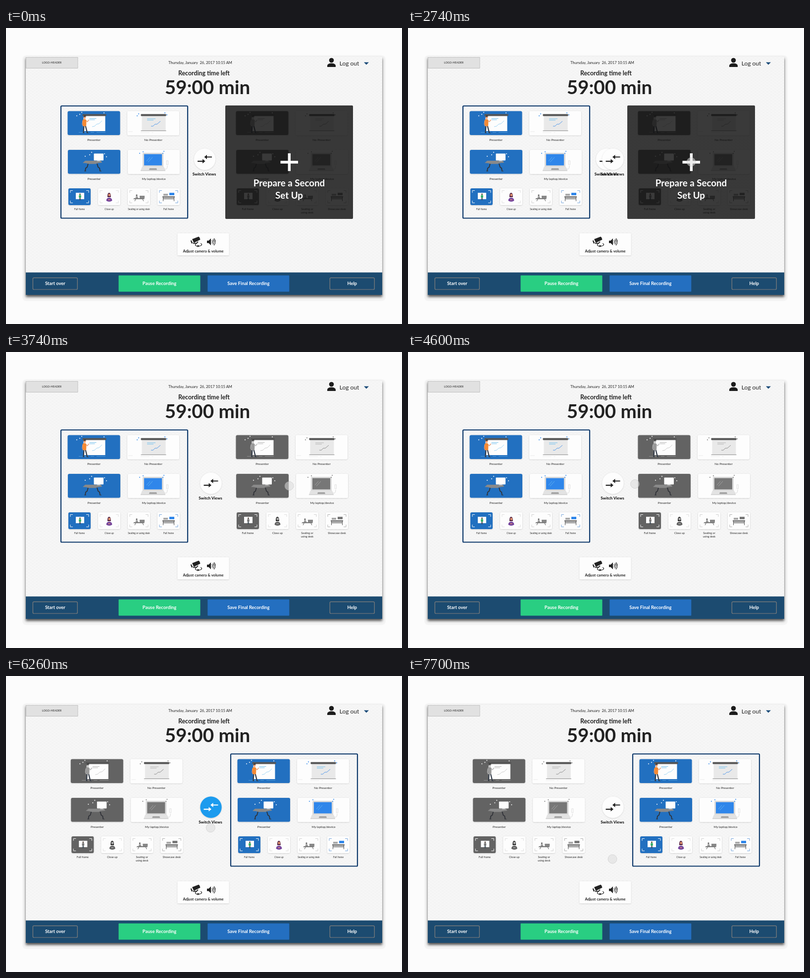
Recreate the animation shown at these times as an HTML page. Size 800 by 600 pixels, loop 8 s.

```html
<!DOCTYPE html>
<html lang="en">
<head>
<meta charset="utf-8">
<title>Recording screen</title>
<style>
  html, body { margin: 0; width: 100%; height: 100%; overflow: hidden; background: #fcfcfc; }
  svg { display: block; width: 800px; height: 600px; }
  text { font-family: Lato, "Open Sans", sans-serif; text-anchor: middle; fill: #222; }
  .bold { font-weight: 700; }
  .white { fill: #fff; }
</style>
</head>
<body>
<svg id="stage" viewBox="0 0 800 600"></svg>
<script>
const stage = document.getElementById('stage');

const rect = (x, y, w, h, fill, more = '') =>
  `<rect x="${x}" y="${y}" width="${w}" height="${h}" fill="${fill}" ${more}/>`;
const shape = (d, fill, more = '') => `<path d="${d}" fill="${fill}" ${more}/>`;
const line = (d, color, width = 1) =>
  `<path d="${d}" fill="none" stroke="${color}" stroke-width="${width}"/>`;
const dot = (x, y, r, fill) => `<circle cx="${x}" cy="${y}" r="${r}" fill="${fill}"/>`;
const label = (x, y, size, words, cls = '', more = '') =>
  `<text x="${x}" y="${y}" font-size="${size}" class="${cls}" ${more}>${words}</text>`;
const group = (id, content) => `<g id="${id}">${content}</g>`;
const stars = (color, ...points) =>
  points.map(([x, y]) => shape(`M${x} ${y - 1.2}l1.2 1.2-1.2 1.2-1.2-1.2z`, color)).join('');

const card = (x, y, w, h, fill) => rect(x, y, w, h, fill, 'rx="3" filter="url(#soft)"');

const brackets = (x, color) => line(
  `M${x + 4} 334v-4.500h5M${x + 36} 329.5h5v4.5M${x + 41} 350v4.5h-5M${x + 9} 354.5h-5v-4.5`, color, .9);

const colored = {
  main: '#246fc0', accent: '#2f86ea', light: '#79c3ef', shirt: '#f58a33', skin: '#e99a70',
  green: '#2bad65', purple: '#71409c', hair: '#5a2947', bracket: '#6b9fda'
};
const grey = {
  main: '#646464', accent: '#777', light: '#b7b7b7', shirt: '#999', skin: '#b5b5b5',
  green: '#777', purple: '#606060', hair: '#333', bracket: '#aaa'
};

function board(x, screen, c) {
  return rect(x, 178, 44, 31, screen) +
    rect(x - 2, 174.5, 48, 4, '#555', 'rx="1"') +
    rect(x + 12, 183, 14, 1, c.light) + rect(x + 12, 185.5, 11, 1, c.light);
}

function presenterCard(c) {
  return card(124.5, 168.5, 106, 48.5, c.main) + board(156.5, '#fdfdfd', c) +
    line('M174 200l5-1 4-4 5-1 6-6', c.light, .7) +
    line('M147 211.5h20M171 211.5h7M183 211.5h18', c.light, .5) +
    line('M157.500 198l-1 14M160.500 198l3.500 14', '#333b48', 2.2) +
    line('M155.500 212.500h3M163 212.5h4', '#242b33', 1.2) +
    shape('M154.500 188q.5-3.500 4-3.500t4 3.500l-.5 11h-6.500z', c.shirt) +
    line('M162 188l2.5 2 3-4', c.skin, 1.3) +
    line('M155 188l-1 7 2 4', c.skin, 1.2) +
    dot(159, 181.500, 2.4, c.skin) + shape('M156.5 181q-.5-3.500 2.700-3.500 3 0 2.600 2l-3.500.5z', '#333') +
    stars('#fff', [143, 178], [149, 175], [153, 171], [198, 172]);
}

function screenCard(c) {
  return card(245, 168.5, 105, 49, '#fdfdfd') +
    rect(274.5, 178, 48, 30, '#e9e9e9') + rect(272.5, 174.5, 51, 4, '#555', 'rx="1"') +
    rect(285, 183.5, 17, 1, c.light) + rect(285, 186.3, 13, 1, c.light) +
    line('M293 199h4l4-4h4l7-6', c.accent, .8) +
    rect(272.5, 207.7, 51, 1.2, '#999') +
    line('M272 212h18M294 212h4M247 210h9', '#e2e2e2', .7) +
    stars(c.accent, [265, 178], [268, 174], [321, 172], [325, 176]);
}

function deskCard(c) {
  return card(125, 247, 106, 48.5, c.main) +
    line('M166 275l-2 7-3 2-1 6M184 275l2 7 3 2 1 6', '#303238', 1.8) +
    line('M158 290h4M189 290h4', '#303238', 1.2) +
    shape('M160 269h32l2 4q-8 0-13 2.500h-14q-5-2-12-2z', '#898989') +
    rect(177.500, 254.500, 19.500, 14, '#fdfdfd', 'rx="1"') + shape('M185 268.500h4l2 1.500h-8z', '#ddd') +
    stars('#fff', [160, 260], [169, 257], [173, 252], [199, 255], [203, 261]);
}

function laptopCard(c) {
  return card(246, 247, 105, 49, '#fdfdfd') +
    rect(276, 253, 42, 29, '#dadada', 'rx="2.5"') + rect(279, 255.700, 36, 22.800, c.accent) +
    line('M284 270l7-8M287 272l9-10', c.light, .7) +
    shape('M275 281h44l3 8h-50z', '#e3e3e3') + rect(272, 288.5, 50, 1.3, '#ccc') +
    shape('M290 284.500h14l1 3h-16z', '#999') +
    line('M319 286h4q3 0 3-7', '#d5d5d5', .9) + rect(324.500, 269, 3, 8, '#fff', 'stroke="#ccc" stroke-width=".6"') +
    stars(c.accent, [270, 254], [277, 251], [317, 254], [319, 250]);
}

function smallCards(c) {
  return [126, 186, 246, 306].map((x, i) =>
      card(x, 325, 45, 34, i ? '#fdfdfd' : c.main) +
      brackets(x, ['#fff', '#ddd', '#ccc', c.bracket][i])).join('') +
    rect(141, 334, 17, 13, '#fdfdfd') + dot(149.5, 337, 1.4, '#4a3b32') +
    rect(147.200, 338.5, 4.600, 5.500, c.green, 'rx="1.5"') + line('M148.700 344v5M150.300 344v5', '#34424d', 1.1) +
    shape('M205 343q-.5-9 3.300-9t3.500 9z', c.hair) + dot(208.7, 338.5, 2.2, c.skin) +
    shape('M202.5 350q.5-6 6-6t6 6q-6 4-12 0z', c.purple) + rect(206, 347.5, 5, 1.3, c.skin) +
    dot(264, 339, 1.6, '#555') + shape('M262.500 341h3l2 4h-6z', '#999') +
    shape('M259 345h19l2 2h-23z', '#777') + line('M262 347l-2 4M276 347l2 4', '#555', 1) +
    rect(270, 340, 10, 5.500, '#888') +
    rect(330, 334, 10, 5, c.accent) + rect(318, 336, 9, 4, '#aaa') +
    rect(316, 341, 25, 2.500, '#777') + rect(317, 343.500, 23, 4, '#aaa') +
    line('M317.500 343v8M339.500 343v8', '#555', 1);
}

function views(c, size, names) {
  return presenterCard(c) + screenCard(c) + deskCard(c) + laptopCard(c) + smallCards(c) +
    label(177.5, 229, 6.3, 'Presenter') + label(297.5, 229, 6.3, 'No Presenter') +
    label(178, 308, 6.3, 'Presenter') + label(298.5, 308, 6.3, 'My laptop/device') +
    names.map((name, i) => name.split('|').map((row, r) =>
      label(148.5 + 60 * i, 368.5 + 7 * r, size, row)).join('')).join('');
}

function switchButton(id) {
  const arrows = 'M428.500 260.4h-10v-3.400l-5.500 4.500 5.500 4.500v-3.400h10zM399.500 269h10v-3.400l5.500 4.500-5.500 4.500v-3.400h-10z';
  return group(id, `<circle class="disc" cx="414" cy="266" r="21.7" fill="#fdfdfd" filter="url(#soft)"/>` +
    `<path class="arrows" d="${arrows}" fill="#222"/>` +
    label(413, 299, 8, 'Switch Views', 'bold', 'style="fill:#000"'));
}

const header =
  rect(40.5, 59.5, 104.5, 22, '#e1e1e1', 'stroke="#b8b8b8" stroke-width=".8"') +
  label(92.5, 72, 5.5, 'LOGO-HEADER') +
  label(392.5, 73, 7.6, 'Thursday, January&#160; 26, 2017 10:15 AM') +
  dot(657.5, 65.5, 4.8, '#1c1c1c') + shape('M649 79v-3q1-4.5 8.5-4.5t8.5 4.5v3z', '#1c1c1c') +
  label(693.5, 75.5, 12, 'Log out') + shape('M723 69.5h10l-5 5z', '#174a78') +
  label(400, 96, 12.3, 'Recording time left', 'bold') +
  label(407, 134, 38.6, '59:00 min', 'bold');

const adjustPanel =
  rect(346.5, 416, 104, 45, '#fdfdfd', 'rx="2" filter="url(#soft)"') +
  shape('M376 428l13-5q2 0 3.500 6l-13 6.500zM374 429.500l3.500 6.500-2.500 1-2-5z', '#222') +
  line('M388 433l-3 3.500h-7', '#222', 1.8) +
  line('M384 437.500q-3.500 3 1 4.500 5 1 9-1 3.500-2.500-1-4.500', '#222', 1.3) +
  shape('M387 439.500l4 2.500-4 2.500z', '#222') +
  shape('M406 431h3.5l4.5-4.5v14l-4.5-4.5h-3.5z', '#222') +
  line('M416 430.500q2.500 3 0 6M418 428.5q4.500 5 0 10M420 426.500q6 7 0 14', '#222', 1.2) +
  label(398.5, 455, 7.6, 'Adjust camera &amp; volume', 'bold');

const outlined = (x, words) =>
  rect(x, 506.3, 90, 23.7, 'none', 'rx="2" stroke="#827f7c" stroke-width="1.2"') +
  label(x + 45, 521, 9.3, words, 'bold white');
const filled = (x, color, words) =>
  rect(x, 501.5, 165, 33, color, 'rx="1"') + label(x + 82.5, 521, 9.3, words, 'bold white');

const footer = rect(40, 495.5, 720, 45.5, '#1c4b70') +
  outlined(54.3, 'Start over') + filled(227.5, '#29ce82', 'Pause Recording') +
  filled(407.3, '#246fc0', 'Save Final Recording') + outlined(654.3, 'Help');

const prepare = rect(443, 157, 258, 230, '#101010', 'rx="2" opacity=".825"') +
  line('M554.5 272h35.5M572.3 254v36', '#fff', 5.4) +
  label(572, 321, 18.7, 'Prepare a Second', 'bold white') +
  label(572, 346, 18.7, 'Set Up', 'bold white');

stage.innerHTML = `<defs>
  <filter id="soft" x="-20%" y="-20%" width="140%" height="150%">
    <feDropShadow dx="0" dy=".6" stdDeviation="1.1" flood-opacity=".2"/></filter>
  <filter id="deep" x="-5%" y="-5%" width="110%" height="110%">
    <feDropShadow dx="0" dy="4" stdDeviation="2.6" flood-opacity=".65"/></filter>
  <pattern id="paper" width="8" height="6" patternUnits="userSpaceOnUse">
    ${rect(0, 0, 8, 6, '#f7f7f7')}${line('M0 2q2-2 4 0t4 0M-4 5q2-2 4 0t4 0 4 0 4 0', '#f0f0f0', .9)}
  </pattern>
  <clipPath id="window">${rect(40, 58, 720, 483, '#000')}</clipPath></defs>` +
  rect(0, 0, 800, 600, '#fcfcfc') + rect(33, 55.5, 734, 498, '#f4f4f4', 'rx="8"') +
  rect(40, 58, 720, 483, '#f6f6f6', 'filter="url(#deep)"') + rect(40, 58, 720, 483, 'url(#paper)') +
  header + adjustPanel + footer +
  group('spare', views(grey, 5.5, ['Full frame', 'Close up', 'Seating or|using desk', 'Showcase desk'])) +
  group('active', rect(111, 158, 256, 227.5, 'none', 'rx="1.5" stroke="#0f3a6c" stroke-width="2.2"') +
    views(colored, 4.8, ['Full frame', 'Close up', 'Seating or using desk', 'Full frame'])) +
  group('prepare', prepare) + switchButton('oldSwitch') + switchButton('newSwitch') +
  `<g clip-path="url(#window)"><circle id="cursor" r="9" fill="#dcdcdc" fill-opacity=".55" stroke="#aaa" stroke-opacity=".45" stroke-width=".8"/></g>`;

const part = id => document.getElementById(id);
const [spare, active, overlay, oldSwitch, newSwitch, cursor] =
  ['spare', 'active', 'prepare', 'oldSwitch', 'newSwitch', 'cursor'].map(part);
const disc = newSwitch.querySelector('.disc'), arrows = newSwitch.querySelector('.arrows');

// Eased progress from 0 to 1 between two times.
function ease(t, from, to) {
  const p = Math.min(1, Math.max(0, (t - from) / (to - from)));
  return p * p * (3 - 2 * p);
}
const mix = (a, b, p) => a + (b - a) * p;
const blend = (a, b, p) => `rgb(${a.map((v, i) => Math.round(mix(v, b[i], p)))})`;
const shift = (el, x) => el.setAttribute('transform', `translate(${x} 0)`);

// Each stop: start, end, x, y.
const cursorPath = [[300, 820, 739, 354], [1110, 2100, 572, 271.5], [4050, 4900, 413.5, 266], [6080, 6500, 413, 371]];

function draw(t) {
  let x = 771, y = 354;
  for (const [from, to, nextX, nextY] of cursorPath) {
    const p = ease(t, from, to);
    x = mix(x, nextX, p);
    y = mix(y, nextY, p);
  }
  cursor.setAttribute('cx', x);
  cursor.setAttribute('cy', y);

  const gone = 1 - ease(t, 2740, 3060);
  overlay.setAttribute('opacity', gone);
  oldSwitch.setAttribute('opacity', gone);
  newSwitch.setAttribute('opacity', ease(t, 2600, 2720));
  shift(oldSwitch, -12.5);

  const swap = ease(t, 5800, 6200);
  shift(active, 343 * swap);
  shift(spare, mix(340, 6.3, swap));

  const pressed = ease(t, 5700, 5800) - ease(t, 6620, 6900);
  disc.setAttribute('fill', blend([253, 253, 253], [30, 155, 238], pressed));
  arrows.setAttribute('fill', blend([34, 34, 34], [255, 255, 255], pressed));
}

function tick() {
  draw(performance.now() % 8000);
  requestAnimationFrame(tick);
}
tick();
</script>
</body>
</html>
```
